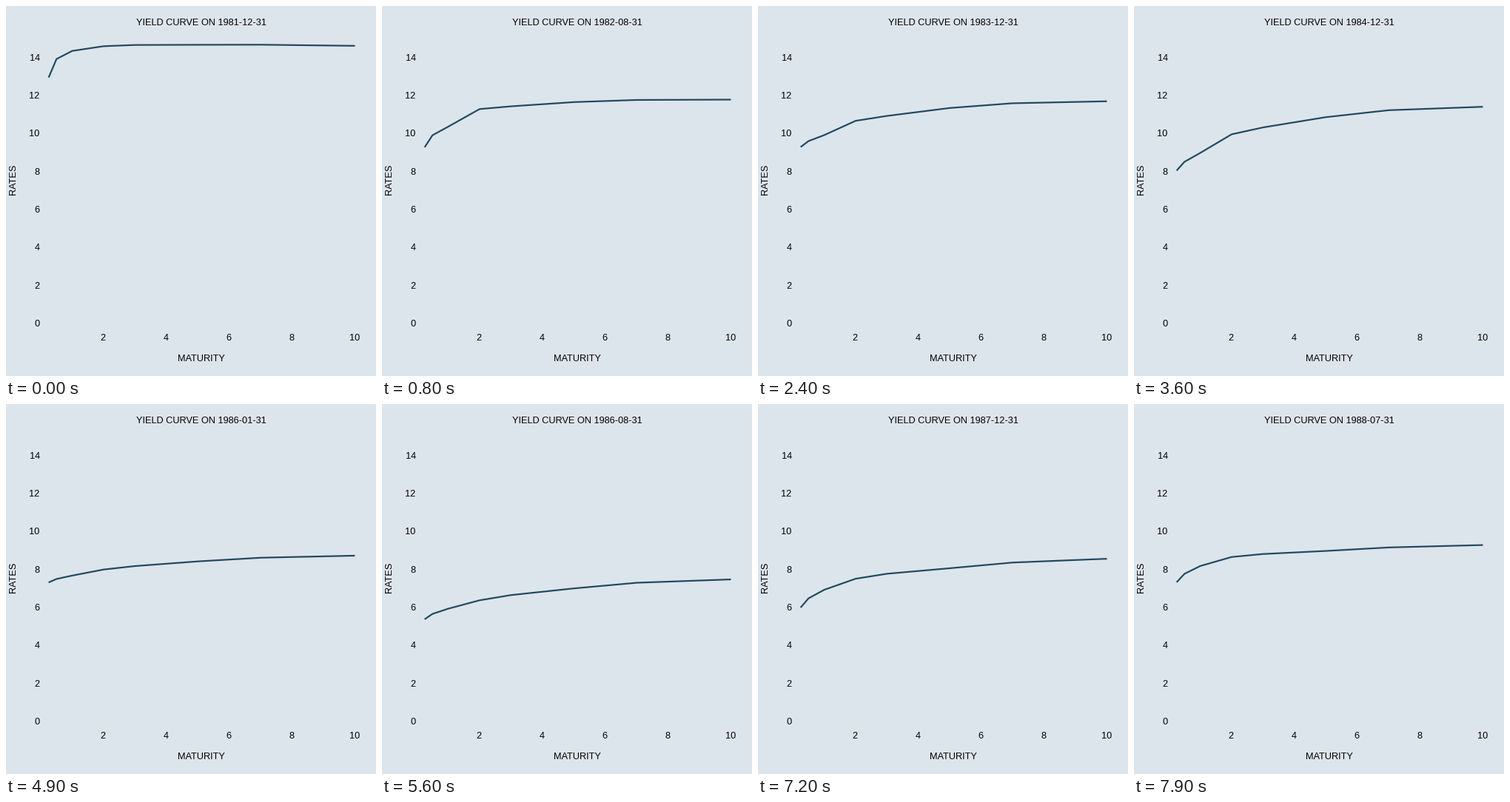
Write a matplotlib script that moves like this. It is 500 px wide and 500 px high and loops after 8000 ms.

```python
import matplotlib.pyplot as plt
import numpy as np
from matplotlib.animation import FuncAnimation

SIZE, DPI = 500, 100
MONTHS, STEP_MS = 80, 100
BG, INK, LINE = "#dde5ec", "#000000", "#224a60"
PX = 72 / DPI  # points per pixel

MATURITY = np.array([0.25, 0.5, 1, 2, 3, 5, 7, 10])

# turning points: month, 3-month rate, 2-year rate, 10-year rate
TURNS = np.array([
    (0, 12.92, 14.57, 14.59), (5, 13.08, 14.47, 14.30), (9, 7.97, 10.19, 10.91),
    (16, 8.50, 9.49, 10.38), (19, 9.74, 11.07, 11.85), (24, 9.26, 10.64, 11.67),
    (30, 10.53, 12.88, 13.36), (32, 10.80, 12.20, 12.52), (36, 8.02, 9.93, 11.38),
    (41, 7.18, 8.69, 10.16), (45, 7.40, 8.86, 10.24), (49, 7.29, 7.97, 8.70),
    (51, 6.24, 6.70, 7.30), (56, 5.35, 6.35, 7.45), (62, 5.77, 6.42, 7.25),
    (64, 5.87, 7.76, 8.61), (69, 6.35, 8.40, 9.52), (73, 5.84, 7.18, 8.21),
    (79, 7.30, 8.63, 9.26),
])


def curve(month):
    short, mid, long = (np.interp(month, TURNS[:, 0], col) for col in TURNS[:, 1:].T)
    # the early hump fades while the bends drift steadily
    hump = np.exp(-month / 7)
    front = np.array([0.16 + 0.0022 * month + 0.43 * hump,
                      0.35 + 0.0037 * month + 0.50 * hump])
    back = np.array([0.25, 0.72 - 0.0027 * month, 0.94 - 0.0018 * month])
    return np.array([short, *(short + front * (mid - short)),
                     mid, *(mid + back * (long - mid) + 0.06 * hump), long])


def to_x(years):
    return 47 + 42.45 * years


def to_y(rate):
    return 428.2 - 25.66 * rate


def month_end(month):
    first = (np.datetime64("1982-01") + month).astype("datetime64[D]")
    return str(first - 1)


fig = plt.figure(figsize=(SIZE / DPI, SIZE / DPI), dpi=DPI, facecolor=BG)
ax = fig.add_axes([0, 0, 1, 1])
ax.set(xlim=(0, SIZE), ylim=(SIZE, 0))
ax.axis("off")


def label(x, y, text, ha="center", rotation=0):
    return ax.text(x, y, text, ha=ha, va="baseline", rotation=rotation,
                   rotation_mode="anchor", color=INK,
                   family="Liberation Sans", size=12.8 * PX)


for tick in range(0, 15, 2):
    label(45.7, to_y(tick) + 4.7, str(tick), ha="right")
for tick in range(2, 11, 2):
    label(to_x(tick) - 0.6, 451.5, str(tick))
label(264.3, 480.5, "MATURITY")
label(13.5, 234.5, "RATES", rotation=90)
title = label(264.3, 26, "")

line, = ax.plot([], [], color=LINE, lw=2.2 * PX,
                solid_capstyle="butt", solid_joinstyle="round")


def draw(month):
    line.set_data(to_x(MATURITY), to_y(curve(month)))
    title.set_text("YIELD CURVE ON " + month_end(month))
    return line, title


anim = FuncAnimation(fig, draw, frames=MONTHS, interval=STEP_MS,
                     repeat=True, repeat_delay=0)
plt.show()
```
